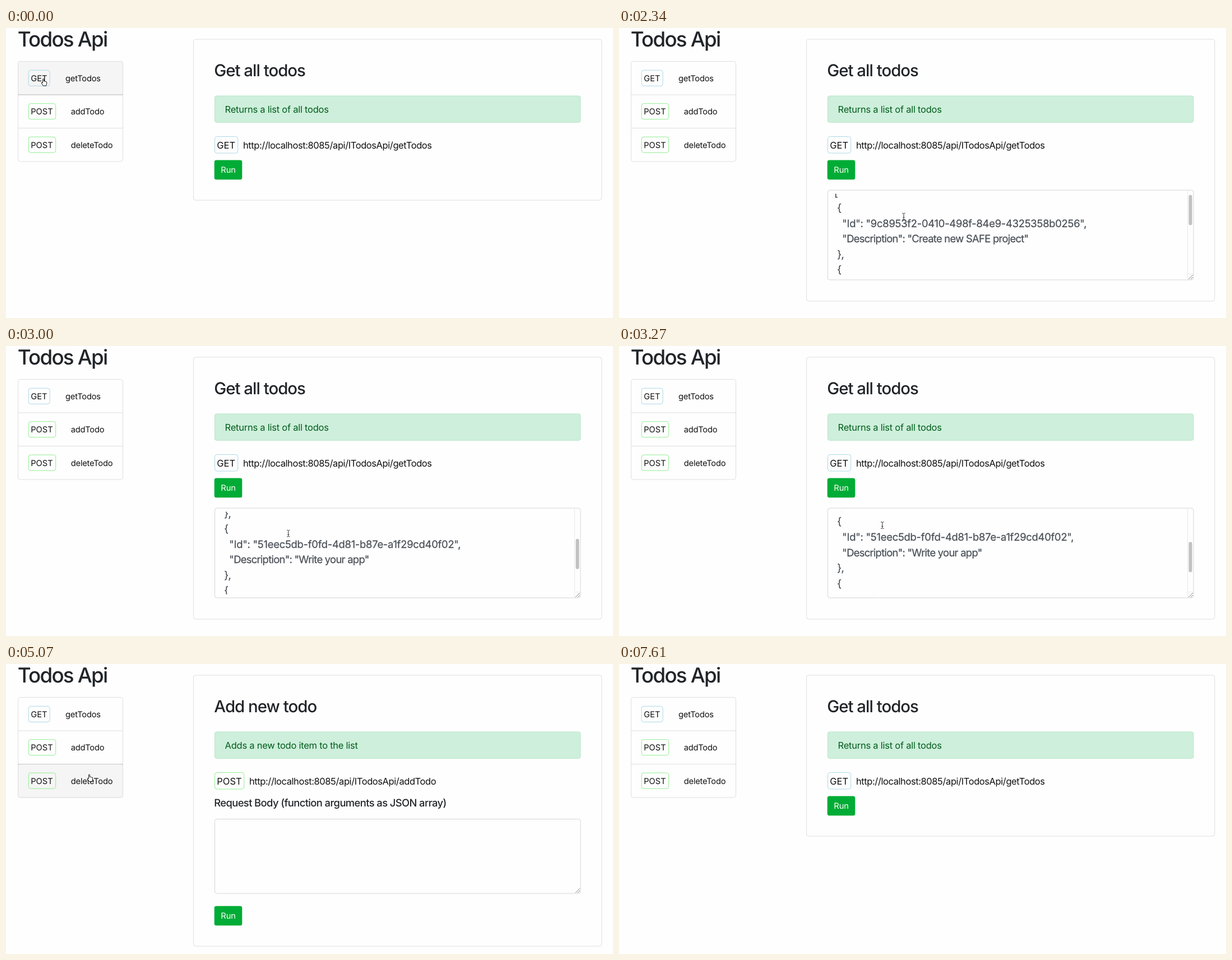
These frames come from a looping animation (1083x517 px, 9.42 s). An HTML page:

```html
<!DOCTYPE html>
<html lang="en">
<head>
<meta charset="utf-8">
<title>Todos Api</title>
<style>
  html, body { margin: 0; width: 100%; height: 100%; overflow: hidden; background: #fefefe; }
  svg { display: block; width: 100vw; height: 100vh; }
  text { font-family: Inter, Roboto, sans-serif; font-optical-sizing: none; fill: #111; text-rendering: geometricPrecision; }
  .h1, .h2, .h5 { font-weight: 500; fill: #212529; }
  .h1 { font-size: 36.7px; letter-spacing: -.048em; }
  .h2 { font-size: 29.4px; letter-spacing: -.034em; }
  .h5 { font-size: 18.4px; letter-spacing: -.033em; }
  .tag { font-size: 14.7px; }
  .name { font-size: 14.7px; letter-spacing: -.015em; }
  .bigtag { font-size: 16.5px; }
  .note { font-size: 16.5px; letter-spacing: -.015em; fill: #005c1b; }
  .url { font-size: 16.5px; letter-spacing: -.025em; }
  .code { font-size: 18.4px; letter-spacing: -.039em; fill: #495057; stroke: #495057; stroke-width: .25px; }
  .code.id { letter-spacing: -.014em; }
  .run { font-size: 14.7px; fill: #fff; }
</style>
</head>
<body>
<svg id="stage" viewBox="0 0 1083 517"></svg>
<script>
const LOOP = 9420;
const BORDER = '#dfdfdf';
const TAG_COLORS = { GET: '#add8e6', POST: '#90ee90' };
const ROW_EDGES = [59.5, 119, 178.5, 238];

const text = (cls, x, y, content) => `<text class="${cls}" x="${x}" y="${y}">${content}</text>`;
const box = (x, y, w, h, fill = 'none', stroke = 'none', r = 4, extra = '') =>
  `<rect x="${x}" y="${y}" width="${w}" height="${h}" rx="${r}" fill="${fill}" stroke="${stroke}" ${extra}/>`;
const line = (d, stroke) => `<path d="${d}" fill="none" stroke="${stroke}"/>`;
const grip = bottom => line(`M1016 ${bottom - 1}l8-8M1020 ${bottom - 1}l4-4`, '#888');
const runButton = (y, id = '') =>
  box(371.7, y, 49.6, 34.9, '#00ac36', 'none', 3.5, id && `id="${id}"`) + text('run', 383.2, y + 23, 'Run');

function sidebar() {
  const rows = [['GET', 'getTodos', 38, 106], ['POST', 'addTodo', 48.5, 115.7], ['POST', 'deleteTodo', 48.5, 115.8]];
  return text('h1', 20.8, 33, 'Todos Api')
    + box(21.5, 59.5, 187, 178.5, 'none', BORDER)
    + line('M21.5 119H208.5M21.5 178.5H208.5', BORDER)
    + '<g id="hover"></g>'
    + rows.map(([verb, name, width, x], i) => {
      const y = 95 + 59.4 * i;
      return box(40.2, y - 19.7, width, 28, 'none', TAG_COLORS[verb])
        + text('tag', 44.2, y, verb) + text('name', x, y, name);
    }).join('');
}

function endpoint(title, note, verb, url, tagWidth) {
  return text('h2', 371.3, 86, title)
    + box(372.4, 121, 652.6, 47.3, '#cdefdb', '#b9e7c9', 3.5)
    + text('note', 390.6, 150.6, note)
    + box(372.5, 193.5, tagWidth, 29.5, 'none', TAG_COLORS[verb])
    + text('bigtag', 376.3, 214.8, verb)
    + text('url', 381.8 + tagWidth, 214.8, url);
}

function responseLines() {
  const todos = [
    ['9c8953f2-0410-498f-84e9-4325358b0256', 'Create new SAFE project'],
    ['51eec5db-f0fd-4d81-b87e-a1f29cd40f02', 'Write your app'],
    ['fc0dbcbb-23ac-4bb9-9007-83a3999c70d7', 'Ship it !!!'],
  ];
  const lines = [['code', 384, '[']];
  todos.forEach(([id, description], i) => lines.push(
    ['code', 389.3, '{'],
    ['code id', 398.3, `"Id": "${id}",`],
    ['code', 398.3, `"Description": "${description}"`],
    ['code', 389.3, i < todos.length - 1 ? '},' : '}']));
  lines.push(['code', 384, ']']);
  return lines.map(([cls, x, content], i) => text(cls, x, 316.2 + 27.55 * i, content)).join('');
}

const response = `<g id="response">
  ${box(372.5, 289, 652.5, 160, 'none', '#d3d6da')}
  ${line('M1014.5 289.5V448.5M1014.5 438.5H1024.5', '#e8e8e8')}
  ${box(1016.5, 290.3, 6, 54, '#c1c1c1', 'none', 3, 'id="thumb"')}
  ${grip(449)}
  <g clip-path="url(#viewport)"><g id="lines">${responseLines()}</g></g>
</g>`;

const stage = document.getElementById('stage');
stage.innerHTML = `
  <clipPath id="viewport"><rect x="373" y="295.5" width="640" height="147"/></clipPath>
  ${sidebar()}
  ${box(334.5, 20, 728.3, 287, 'none', BORDER, 4, 'id="card"')}
  <g id="getView">
    ${endpoint('Get all todos', 'Returns a list of all todos', 'GET', 'http://localhost:8085/api/ITodosApi/getTodos', 41.2)}
    ${runButton(235.4, 'run')}${response}
  </g>
  <g id="addView">
    ${endpoint('Add new todo', 'Adds a new todo item to the list', 'POST', 'http://localhost:8085/api/ITodosApi/addTodo', 52.2)}
    ${text('h5', 371.2, 253.5, 'Request Body (function arguments as JSON array)')}
    ${box(372.5, 276.5, 652.5, 132.5, 'none', '#d3d6da')}${grip(409)}${runButton(431.4)}
  </g>
  <path id="cursor"/>`;

const el = id => document.getElementById(id);
const show = (id, visible) => el(id).setAttribute('display', visible ? 'inline' : 'none');
const set = (id, attrs) => Object.entries(attrs).forEach(([key, value]) => el(id).setAttribute(key, value));

// Stepped progress: the first step lands at start, the last one at end.
function progress(t, start, end, steps) {
  if (t < start) return 0;
  return Math.min(1, (Math.floor((t - start) / (end - start || 1) * (steps - 1)) + 1) / steps);
}

// start, end, steps, destination, optional easing exponent, optional curve control point
const MOVES = [
  [480, 1140, 8, [400, 261.5], 1, [220, 425]],
  [1800, 1980, 3, [508, 336]],
  [3000, 3870, 10, [84, 153], 2],
  [4590, 5070, 6, [150, 203]],
  [5610, 5790, 3, [146, 155]],
  [6050, 6290, 3, [140, 98]],
  [6500, 7430, 11, [1067, 504]],
  [7520, 7520, 1, [1068, 511]],
];
function cursorAt(t) {
  let from = [68, 96.5];
  for (const [start, end, steps, to, power = 1, bend] of MOVES) {
    if (t < start) break;
    const u = progress(t, start, end, steps) ** power;
    from = from.map((a, i) => {
      const mid = bend ? bend[i] : (a + to[i]) / 2;
      return a * (1 - u) ** 2 + 2 * mid * u * (1 - u) + to[i] * u * u;
    });
  }
  return from;
}

const scrollAt = t => 115.5 * progress(t, 2250, 2820, 7)
  + 19 * progress(t, 3000, 3180, 3)
  + 21 * progress(t, 3360, 3630, 4);

const CURSORS = {
  hand: { d: 'M-2.5 1.5V-5a1 1 0 0 1 2 0V-1.5q1-.8 1.8 .3q1-.6 1.7 .4q1.6-.4 1.6 1V3L3.4 6.5H-1.6L-4.8 1.8q-.3-1.4 .9-1.2z',
    fill: '#fff', stroke: '#111' },
  beam: { d: 'M-2.7-6Q-.3-6 0-4.6Q.3-6 2.7-6M0-4.6V4.6M-2.7 6Q-.3 6 0 4.6Q.3 6 2.7 6M-1.6 1.8H1.6',
    fill: 'none', stroke: '#333' },
  arrow: { d: 'M-4-7V5.5L-1.2 2.9L.7 7L2.6 6.1L.8 2.2H4.5z', fill: '#111', stroke: '#fff' },
};

function render(t) {
  const adding = t >= 4590 && t < 6500;
  const responded = t >= 1410 && t < 4590;
  const [x, y] = cursorAt(t);
  const present = t < 7610;
  const inside = (left, top, right, bottom) => present && x > left && x < right && y > top && y < bottom;

  show('getView', !adding);
  show('addView', adding);
  show('response', responded);
  set('card', { height: adding ? 483 : responded ? 467 : 287 });

  const scroll = scrollAt(t);
  set('lines', { transform: `translate(0 ${-scroll})` });
  set('thumb', { y: 290.3 + .438 * scroll });

  const row = [0, 1, 2].findIndex(i => inside(21, ROW_EDGES[i], 209, ROW_EDGES[i + 1]));
  el('hover').innerHTML = row < 0 ? '' :
    box(21.5, ROW_EDGES[row], 187, ROW_EDGES[row + 1] - ROW_EDGES[row], '#f5f5f5', BORDER, row === 1 ? 0 : 4)
    + [row, row + 1].filter(i => i === 1 || i === 2)
      .map(i => line(`M21 ${ROW_EDGES[i]}H209`, '#c6c6c6')).join('');

  const onRun = !adding && inside(372, 236, 421, 270);
  set('run', { fill: onRun ? '#008c2c' : '#00ac36' });

  const onResponse = responded && inside(372, 289, 1014, 449);
  const kind = row >= 0 || onRun ? 'hand' : onResponse ? 'beam' : 'arrow';
  show('cursor', present);
  set('cursor', { ...CURSORS[kind], transform: `translate(${x} ${y})` });
}

const begin = performance.now();
function tick() {
  render((performance.now() - begin) % LOOP);
  requestAnimationFrame(tick);
}
tick();
</script>
</body>
</html>
```
